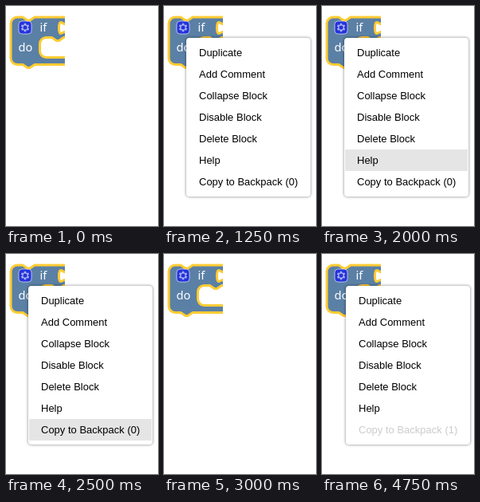
An HTML page with a canvas that plays this animation: 191x276 px, repeating every 7250 ms.

```html
<!DOCTYPE html>
<html lang="en">
<head>
<meta charset="utf-8">
<title>Block context menu</title>
<style>
  html, body { margin: 0; width: 100%; height: 100%; overflow: hidden; background: #fff; }
  canvas { position: absolute; left: 0; top: 0; width: 191px; height: 276px; }
  #menu {
    position: absolute; top: 40px; width: 154px; padding: 4px 0;
    border: 1px solid transparent; border-radius: 4px; background: #fff;
    box-shadow: 0 0 3px 1px rgba(0, 0, 0, .3);
    font: 13px/15px "Liberation Sans", Arial, sans-serif; color: #000;
    cursor: default; visibility: hidden;
  }
  #menu div { padding: 6px 0 6px 15px; white-space: nowrap; }
  #menu .hover { background: #e5e5e5; }
  #menu .disabled { color: #ccc; }
</style>
</head>
<body>
<canvas id="stage"></canvas>
<div id="menu"></div>
<script>
const LOOP = 7250;
const LABELS = ["Duplicate", "Add Comment", "Collapse Block", "Disable Block",
  "Delete Block", "Help", "Copy to Backpack"];
const COPY = LABELS.length - 1;

// Each state holds from its start time until the next one.
const STATES = [
  { at: 0, open: false },
  { at: 1250, open: true, left: 28, hover: -1, count: 0 },
  { at: 1750, open: true, left: 28, hover: 3, count: 0 },
  { at: 2000, open: true, left: 28, hover: 5, count: 0 },
  { at: 2500, open: true, left: 28, hover: COPY, count: 0 },
  { at: 3000, open: false },
  { at: 4750, open: true, left: 30, hover: -1, count: 1 }
];

const menu = document.getElementById("menu");
const items = LABELS.map(label => {
  const item = document.createElement("div");
  item.textContent = label;
  menu.append(item);
  return item;
});

function drawGear(ctx, x, y) {
  ctx.save();
  ctx.translate(x, y);
  ctx.globalAlpha = 0.6;
  ctx.beginPath();
  ctx.roundRect(0, 0, 16, 16, 4);
  ctx.fillStyle = "#00f";
  ctx.fill();
  ctx.strokeStyle = "#fff";
  ctx.lineWidth = 1;
  ctx.stroke();

  ctx.translate(8, 8);
  ctx.beginPath();
  for (let tooth = 0; tooth < 6; tooth++) {
    const angle = tooth * Math.PI / 3 - Math.PI / 2;
    for (const [turn, radius] of [[-0.36, 3.9], [-0.22, 5.4], [0.22, 5.4], [0.36, 3.9]]) {
      ctx.lineTo(radius * Math.cos(angle + turn), radius * Math.sin(angle + turn));
    }
  }
  ctx.closePath();
  ctx.moveTo(2.5, 0);
  ctx.arc(0, 0, 2.5, 0, Math.PI * 2);
  ctx.fillStyle = "#fff";
  ctx.fill("evenodd");
  ctx.restore();
}

function drawBlock() {
  const canvas = document.getElementById("stage");
  const ratio = window.devicePixelRatio || 1;
  canvas.width = Math.round(191 * ratio);
  canvas.height = Math.round(276 * ratio);
  const ctx = canvas.getContext("2d");
  ctx.scale(ratio, ratio);
  ctx.beginPath();
  ctx.rect(0, 0, 74, 276);
  ctx.clip();

  const notchBack = "l-6,4 -3,0 -6,-4";
  const outline = new Path2D([
    "M6,22 a8,8 0 0 1 8,-8 h7 l6,4 3,0 6,-4 H75.5 v5.5",
    "c0,10.5 -9,-8.5 -9,8 s9,-2.5 9,8 V39.5 H72.5", notchBack,
    "h-7 a8,8 0 0 0 -8,8 v9 a8,8 0 0 0 8,8 H75.5 V73.5 H36", notchBack,
    "H14 a8,8 0 0 1 -8,-8 Z"
  ].join(" "));
  ctx.fillStyle = "#5b80a5";
  ctx.fill(outline);
  ctx.strokeStyle = "#fc3";
  ctx.lineWidth = 3;
  ctx.stroke(outline);

  drawGear(ctx, 16, 19);
  ctx.fillStyle = "#fff";
  ctx.font = '14.67px "Noto Sans", "Open Sans", sans-serif';
  ctx.fillText("if", 42.5, 32);
  ctx.fillText("do", 15.5, 57);
}

let shown = null;

function show(state) {
  if (state === shown) return;
  shown = state;
  menu.style.visibility = state.open ? "visible" : "hidden";
  if (!state.open) return;
  menu.style.left = state.left + "px";
  items.forEach((item, i) => item.classList.toggle("hover", i === state.hover));
  items[COPY].textContent = `${LABELS[COPY]} (${state.count})`;
  items[COPY].classList.toggle("disabled", state.count > 0);
}

const start = performance.now();

function tick() {
  const time = (performance.now() - start) % LOOP;
  show(STATES.findLast(state => state.at <= time));
  requestAnimationFrame(tick);
}

drawBlock();
tick();
</script>
</body>
</html>
```
